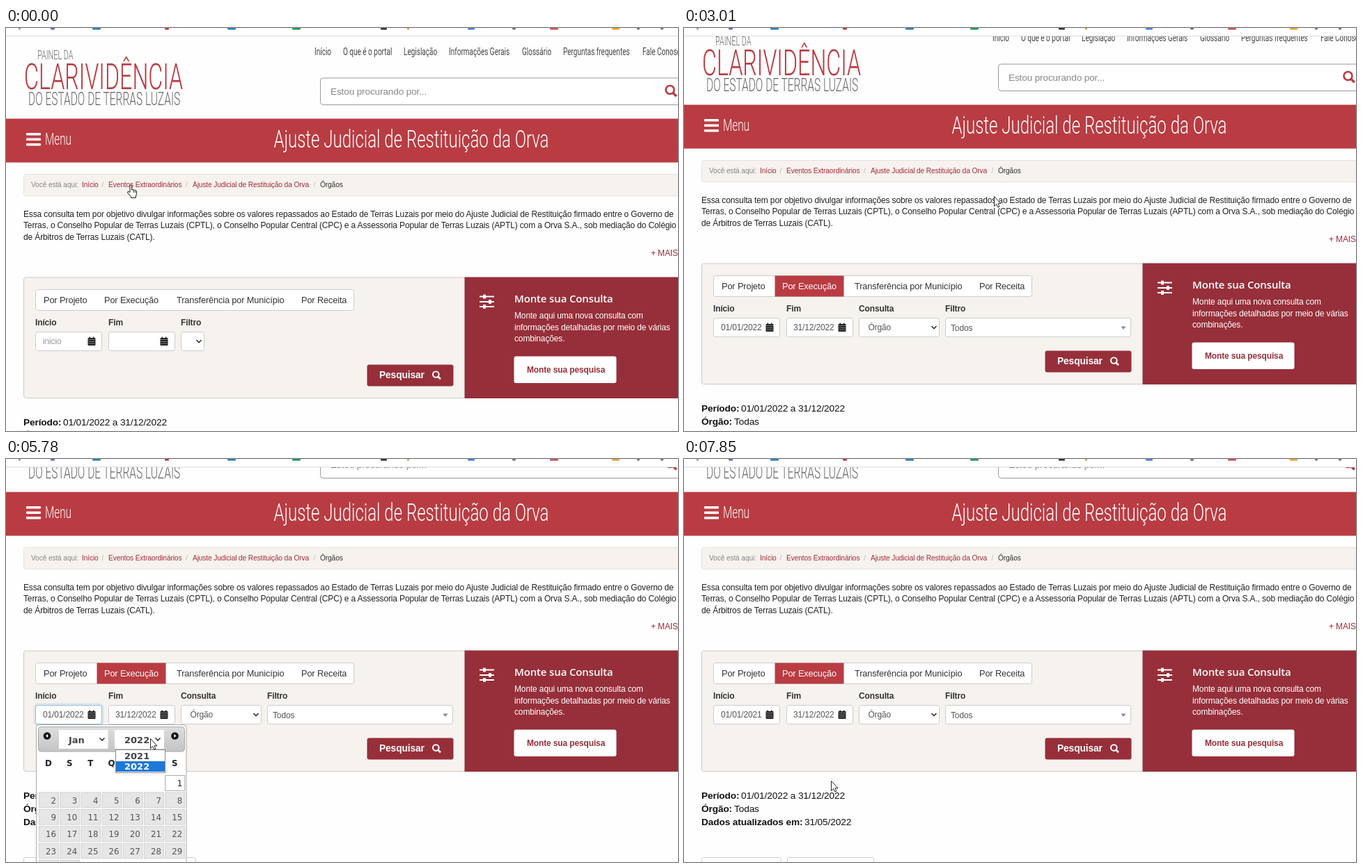
An HTML page for the animation above (8 s loop, 965 px wide and 580 px high).

```html
<!DOCTYPE html>
<html lang="pt-BR">
<head>
<meta charset="utf-8">
<title>Consulta</title>
<style>
html, body { margin: 0; width: 100%; height: 100%; overflow: hidden; background: #fefefe; }
svg { display: block; }
text { font: 12px 'Liberation Sans', Arial, sans-serif; letter-spacing: -.14px; fill: #333; white-space: pre; }
.b { font-weight: 700; }
.crumb { font-size: 10.2px; letter-spacing: -.12px; }
.link { fill: #a82c3b; }
.grey { fill: #888; }
.input { fill: #555; }
.tab { font-size: 12.8px; }
.white { fill: #fff; }
.body { fill: #222; }
.info { font-size: 13.7px; fill: #111; }
.slim { font-family: Roboto, sans-serif; font-weight: 300; letter-spacing: 0; }
.nav { font-size: 15px; font-weight: 400; fill: #444; }
.head { font: 600 15px 'Open Sans', 'Noto Sans', sans-serif; fill: #fff; }
.cal { font: 11.8px 'DejaVu Sans', sans-serif; letter-spacing: 0; fill: #555; }
.day { font-weight: 700; fill: #222; }
.pick { font: 700 13px 'DejaVu Sans', sans-serif; letter-spacing: 0; fill: #444; }
</style>
</head>
<body>
<svg id="stage" width="965" height="580" viewBox="0 0 965 580"></svg>
<script>
const RED = '#b93c42', WINE = '#962f3a', BEIGE = '#f6f2ee';

const text = (x, y, s, cls = '', extra = '') => `<text x="${x}" y="${y}" class="${cls}" ${extra}>${s}</text>`;
const slim = (x, y, s, size, fill, k = .667, extra = '') =>
  `<text transform="translate(${x} ${y}) scale(${k} 1)" class="slim" style="font-size:${size}px;fill:${fill}" ${extra}>${s}</text>`;
const box = (x, y, w, h, fill, stroke = 'none', r = 0, extra = '') =>
  `<rect x="${x}" y="${y}" width="${w}" height="${h}" rx="${r}" fill="${fill}" stroke="${stroke}" ${extra}/>`;
const path = (d, stroke, w = 1, fill = 'none') => `<path d="${d}" fill="${fill}" stroke="${stroke}" stroke-width="${w}"/>`;
const group = (id, s, extra = '') => `<g id="${id}" ${extra}>${s}</g>`;
const chevron = (x, y) => path(`M${x - 3.5} ${y - 2}l3.5 3.6 3.5-3.6`, '#333', 1.6);
const lens = (x, y, r, w, color) =>
  `<circle cx="${x}" cy="${y}" r="${r}" fill="none" stroke="${color}" stroke-width="${w}"/>` +
  path(`M${x + r * .7} ${y + r * .7}l${r * .85} ${r * .85}`, color, w * 1.3);
const field = (x, w) => box(x + .5, 437.5, w - 1, 27, '#fff', '#ccc', 3);
const dateIcon = x => box(x, 446, 11, 11, '#222', 'none', 1) + box(x + 2, 444.5, 1.6, 2, '#222') + box(x + 7.4, 444.5, 1.6, 2, '#222') +
  path(`M${x} 448.5h11M${x + 1} 451.5h9M${x + 1} 454.3h9`, '#bbb', .6);

function header() {
  const nav = [[443, 'Início'], [484, 'O que é o portal'], [571, 'Legislação'], [636, 'Informações Gerais'],
    [741, 'Glossário'], [800, 'Perguntas frequentes'], [914, 'Fale Conosco']];
  return slim(45, 45, 'PAINEL DA', 17.5, '#666', .62) +
    slim(26, 88, 'CLARIVIDÊNCIA', 52, RED, .62) +
    slim(32, 111, 'DO ESTADO DE TERRAS LUZAIS', 25, '#666', .62) +
    nav.map(([x, s]) => `<text transform="translate(${x} 38.5) scale(.667 1)" class="slim nav">${s}</text>`).join('') +
    box(451.5, 72, 560, 38.5, '#fff', '#999', 4) + text(466, 96, 'Estou procurando por...', 'grey', 'style="font-size:13.6px"') +
    lens(953.5, 89, 6, 2.6, RED) +
    box(-20, 130.5, 1020, 63, RED) +
    [151, 158.5, 166].map(y => box(29, y, 21, 3.6, '#fff', 'none', 1)).join('') +
    slim(56, 168, 'Menu', 23, '#fff') +
    slim(582, 172, 'Ajuste Judicial de Restituição da Orva', 36, '#fff', .667, 'text-anchor="middle"');
}

function intro() {
  const lines = [
    'Essa consulta tem por objetivo divulgar informações sobre os valores repassados ao Estado de Terras Luzais por meio do Ajuste Judicial de Restituição firmado entre o Governo de',
    'Terras, o Conselho Popular de Terras Luzais (CPTL), o Conselho Popular Central (CPC) e a Assessoria Popular de Terras Luzais (APTL) com a Orva S.A., sob mediação do Colégio',
    'de Árbitros de Terras Luzais (CATL).'];
  return box(25.5, 210.5, 980, 31, BEIGE, '#e6e1dc', 3) +
    text(36, 229.3, 'Você está aqui:', 'crumb grey') +
    text(109, 229.3, 'Início', 'crumb link') +
    text(147, 229.3, 'Eventos Extraordinários', 'crumb link') +
    text(268, 229.3, 'Ajuste Judicial de Restituição da Orva', 'crumb link') +
    text(451, 229.3, 'Órgãos', 'crumb') +
    [137.5, 258, 441.5].map(x => text(x, 229.3, '/', 'crumb', 'style="fill:#bbb"')).join('') +
    lines.map((s, i) => text(25, 271.7 + 16.7 * i, s, 'body')).join('') +
    text(926, 327.7, '+ MAIS', 'link');
}

function form() {
  const tabs = [[54, 'Por Projeto'], [245, 'Transferência por Município'], [424, 'Por Receita']];
  return box(25.5, 359, 640, 173.5, BEIGE, '#ccc', 3) +
    box(42.5, 376.5, 457, 30, '#fff', '#ccc', 3) +
    tabs.map(([x, s]) => text(x, 396, s, 'tab')).join('') +
    text(42, 428, 'Início', 'b') + text(147, 428, 'Fim', 'b') +
    field(42, 96) + field(147, 96) + dateIcon(117.5) + dateIcon(221.5) +
    group('empty', text(141, 396, 'Por Execução', 'tab') + text(53, 455, 'inicio', '', 'style="fill:#999"') +
      text(251, 428, 'Filtro', 'b') + field(251, 34) + chevron(277, 451)) +
    group('filled', box(130.5, 376.5, 99, 30, RED) + text(141, 396, 'Por Execução', 'tab white') +
      group('focus', box(41, 436, 98, 30, 'none', 'rgba(102,175,233,.35)', 5, 'stroke-width="3.5"') + box(42.5, 437.5, 95, 27, 'none', '#66afe9', 3)) +
      text(53, 455, '', 'input', 'id="start"') + text(157, 455, '31/12/2022', 'input') +
      text(251, 428, 'Consulta', 'b') + field(251, 116) + text(264.5, 455, 'Órgão', 'input') + chevron(359, 451) +
      text(375, 428, 'Filtro', 'b') + field(375, 267) + text(383, 455.7, 'Todos', 'input') +
      path('M627.5 449.5h7l-3.5 4.5z', 'none', 0, '#888')) +
    box(518.5, 484.5, 124, 31, WINE, 'none', 3) + text(536, 504.3, 'Pesquisar', 'b white', 'style="font-size:13.8px"') +
    lens(617.3, 498.6, 4.3, 2, '#fff');
}

function side() {
  const knobs = [[386.5, 687], [394, 695], [401, 687]];
  const lines = ['Monte aqui uma nova consulta com', 'informações detalhadas por meio de várias', 'combinações.'];
  return box(658.5, 358.5, 350, 174.5, WINE) +
    knobs.map(([y, x]) => box(680, y - 1, 21, 2, '#fff') + box(x - 2, y - 3, 4, 6, '#fff', 'none', 1)).join('') +
    text(730, 394.8, 'Monte sua Consulta', 'head') +
    lines.map((s, i) => text(730, 418 + 16.7 * i, s, 'white')).join('') +
    box(729.5, 472.5, 147, 38.5, '#fff', 'none', 3) + text(748, 495.7, 'Monte sua pesquisa', 'b', `style="fill:${WINE}"`);
}

function results() {
  const rows = [['Período:', 82, '01/01/2022 a 31/12/2022'], ['Órgão:', 72, 'Todas'], ['Dados atualizados em:', 173, '31/05/2022']];
  return rows.map(([k, x, v], i) => text(25, 571.8 + 19.2 * i, k, 'info b') + text(x, 571.8 + 19.2 * i, v, 'info')).join('') +
    box(25.5, 656.5, 114, 40, '#fff', '#ccc', 3) + box(148.5, 656.5, 124, 40, '#fff', '#ccc', 3);
}

// January of one year; first = weekday column of day 1
function month(year, first) {
  let s = text(170, 408.5, year, 'pick');
  for (let d = 1; d <= 31; d++) {
    const i = d + first - 1, x = 47.5 + 30.2 * (i % 7), y = 455.5 + 24.4 * Math.floor(i / 7);
    const on = d == 1 && year == 2022;
    s += box(x, y, 28, 21.8, on ? '#fff' : '#e6e6e6', on ? '#aaa' : '#d3d3d3') +
      text(x + 24.5, y + 15.6, d, 'cal', `text-anchor="end"${on ? ' style="fill:#222"' : ''}`);
  }
  return group('y' + year, s);
}

function calendar() {
  const arrow = (x, k, id) => group(id, `<circle cx="${x}" cy="398.5" r="5.3" fill="#111"/>` +
    path(`M${x - 2 * k} 398.5l${3.2 * k}-2.8v5.6z`, 'none', 0, '#fff'));
  return box(43.5, 382.5, 215.5, 220, '#fff', '#aaa', 4) +
    box(46.5, 385.5, 210, 35.5, 'url(#bar)', '#aaa', 4) +
    arrow(59, 1, 'prev') + arrow(242.5, -1, 'next') +
    box(76, 390, 70.5, 27, '#fff') + box(156, 390, 71, 27, '#fff') +
    text(90, 408.5, 'Jan', 'pick') + chevron(138, 403.5) + chevron(218, 403.5) +
    [...'DSTQQSS'].map((c, i) => text(61 + 30.2 * i, 441.8, c, 'cal day', 'text-anchor="middle"')).join('') +
    month(2022, 6) + month(2021, 5);
}

const popup = box(157.5, 418.5, 71, 33, '#fff', '#888') + box(158, 420, 70, 15, '#1e78d7', 'none', 0, 'id="mark"') +
  text(170, 432, '2021', 'pick', 'id="opt0"') + text(170, 447, '2022', 'pick', 'id="opt1"');

const tabStrip = box(0, 0, 965, 12, '#fff') + box(0, 11, 965, 1, '#dcdcdc') +
  [[18, 3, '#999'], [64, 6, '#7a5cc0'], [124, 12, '#2f7fb8'], [228, 6, '#c0373f'], [318, 12, '#2f7fb8'], [411, 12, '#1e9e54'],
    [538, 9, '#333'], [576, 3, '#e8923a'], [663, 10, '#4a7fe0'], [727, 5, '#777'], [781, 12, '#d0505a'], [870, 11, '#e8a33a'],
    [906, 4, '#777'], [940, 4, '#777']].map(([x, w, c]) => box(x, -2, w, 4.4, c, 'none', 1.5)).join('');

const cursor = group('arrow', path('M.5.5V14.5L3.6 11.6 5.8 16 8 15 5.9 10.7H10Z', '#111', .9, '#fff')) +
  group('hand', path('M4.5 11V2a1.3 1.3 0 0 1 2.7 0V7.5q1.4-1 2.4.3 1.4-.8 2.3.5 1.7-.6 2 1V13q0 2-1 3.3V18.8H6V17L1.2 11.6q-.6-1.6 1-1.8Z', '#111', 1, '#fff') +
    path('M9.5 8v3.5M11.8 8.5v3', '#111', .8), 'transform="translate(-4.5 .5)"');

stage.innerHTML = `<defs><linearGradient id="bar" x2="0" y2="1"><stop stop-color="#dedede"/><stop offset="1" stop-color="#c4c4c4"/></linearGradient></defs>` +
  group('page', header() + intro() + form() + side() + results()) +
  group('cal', calendar()) + group('popup', popup) + tabStrip + group('cursor', cursor);

const $ = id => document.getElementById(id);
const show = (id, on) => $(id).style.display = on ? '' : 'none';
const within = (t, a, b) => t >= a && t < b;

// Pointer moves: first step, last step, steps, target, optional bend point
const moves = [
  [140, 700, 5, 466, 247],
  [1610, 1880, 3, 445, 242],
  [3430, 4120, 6, 109, 369, 200, 420],
  [4820, 5490, 6, 207, 402, 290, 585],
  [6190, 6460, 3, 207, 422],
  [6880, 7300, 4, 211, 463]];

function pointer(t) {
  let x = 178, y = 225;
  for (const [a, b, n, tx, ty, bx = (x + tx) / 2, by = (y + ty) / 2] of moves) {
    if (t < a) break;
    const s = Math.min(1, (Math.floor((t - a) / (b - a) * (n - 1) + .01) + 1) / n), r = 1 - s;
    x = r * r * x + 2 * r * s * bx + s * s * tx;
    y = r * r * y + 2 * r * s * by + s * s * ty;
  }
  return [x, y];
}

function draw(t) {
  const ready = t >= 420, old = t < 6740;
  const shift = within(t, 420, 1230) ? 7 : 0;
  const scroll = t < 3010 ? 0 : t < 3160 ? 20 : 83;
  $('page').setAttribute('transform', `translate(${shift} ${-scroll})`);
  show('empty', !ready);
  show('filled', ready);
  $('start').textContent = t < 7580 ? '01/01/2022' : '01/01/2021';

  const fade = t < 7580 ? 1 : t < 7715 ? .65 : t < 7850 ? .25 : 0;
  $('focus').style.opacity = t < 4420 ? 0 : t < 5780 ? 1 : t < 5910 ? .5 : old ? 0 : fade;
  show('cal', t >= 4420);
  $('cal').style.opacity = fade;
  show('y2022', old);
  show('y2021', !old);
  $('prev').style.opacity = old ? 1 : .35;

  const [x, y] = pointer(t);
  const pick = y > 419 ? 0 : 1;
  show('popup', within(t, 5780, 6740));
  $('mark').setAttribute('y', 420 + 15 * pick);
  for (const i of [0, 1]) $('opt' + i).style.fill = i == pick ? '#fff' : '#444';

  const hand = t < 140 || within(t, 4120, 4820) || within(t, 5088, 5356) || within(t, 7300, 7580);
  show('hand', hand);
  show('arrow', !hand);
  $('cursor').setAttribute('transform', `translate(${Math.round(x)} ${Math.round(y)})`);
}

function loop() {
  draw(performance.now() % 8000);
  requestAnimationFrame(loop);
}
loop();
</script>
</body>
</html>
```
